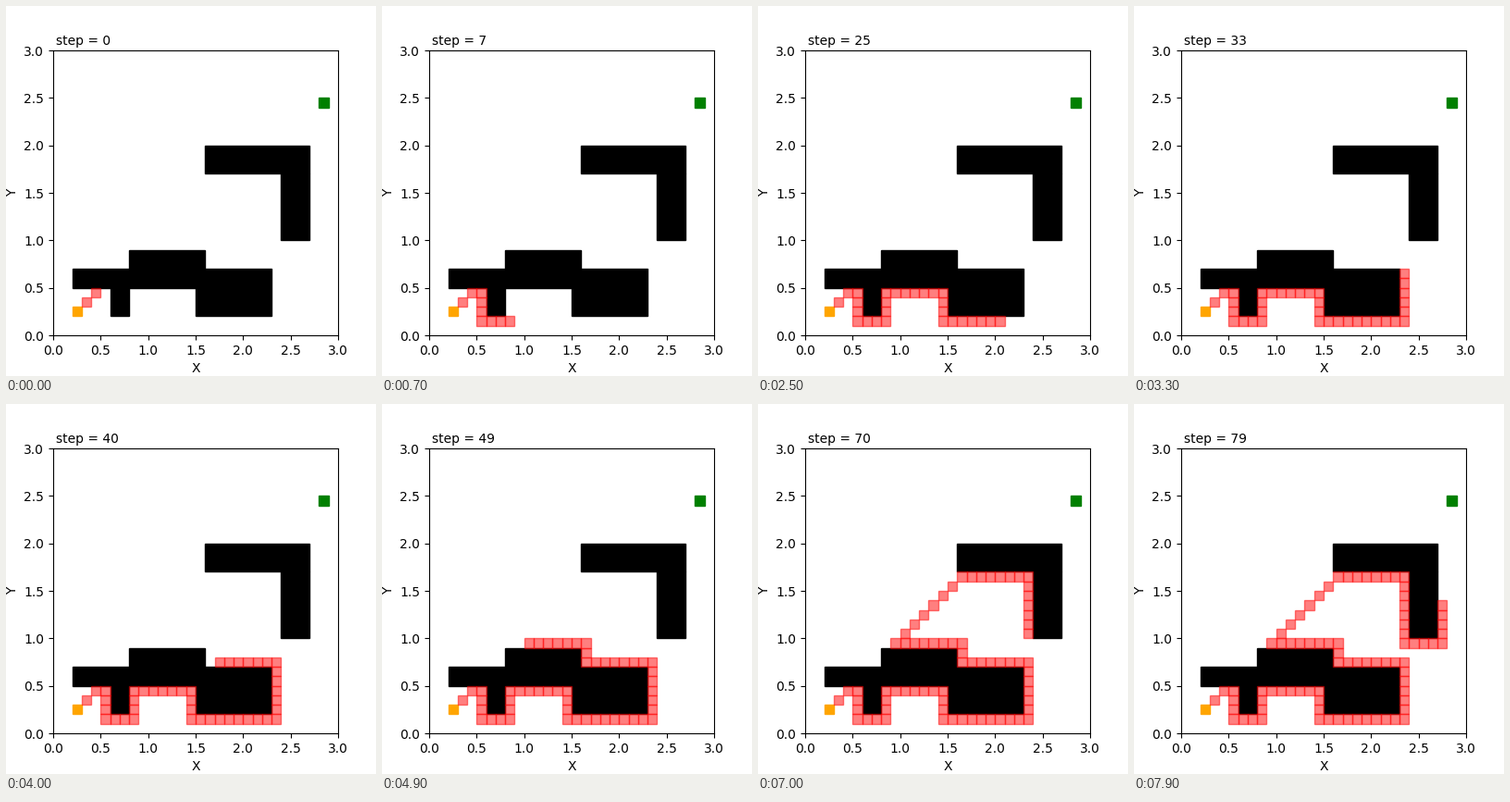
A matplotlib script for the animation above (8000 ms loop, 400x400 px).

```python
import matplotlib.pyplot as plt
from matplotlib.animation import FuncAnimation
from matplotlib.patches import Rectangle

CELL = 0.1
STEPS = 80
START, GOAL = (2, 2), (28, 24)

# left, bottom, right, top in grid cells
WALLS = [
    (2, 5, 8, 7), (6, 2, 8, 5), (8, 5, 16, 9), (15, 2, 23, 7),
    (16, 17, 27, 20), (24, 10, 27, 17),
]


def blocked(x, y):
    return any(l <= x < r and b <= y < t for l, b, r, t in WALLS)


def walk(count):
    """Go diagonally toward the goal; at a wall, keep it on the left
    until the diagonal is met again further on."""
    (x, y), hit = START, None
    dx, dy = 1, 0
    cells = []
    while len(cells) < count:
        on_line = x - START[0] == y - START[1]
        if on_line and (hit is None or x > hit):
            if blocked(x + 1, y + 1):
                hit, dx, dy = x, 1, 0
            else:
                hit = None
        if hit is None:
            x, y = x + 1, y + 1
        else:
            dx, dy = -dy, dx          # try left first, then turn right
            while blocked(x + dx, y + dy):
                dx, dy = dy, -dx
            x, y = x + dx, y + dy
        cells.append((x, y))
    return cells


fig, ax = plt.subplots(figsize=(4, 4), dpi=100)
ax.set_xlim(0, 3)
ax.set_ylim(0, 3)
ax.set_aspect("equal")
ax.set_xlabel("X")
ax.set_ylabel("Y")


def block(x, y, w=1, h=1, **style):
    return ax.add_patch(
        Rectangle((x * CELL, y * CELL), w * CELL, h * CELL, **style))


for l, b, r, t in WALLS:
    block(l, b, r - l, t - b, color="black")
block(*START, color="orange")
block(*GOAL, color="green")

trail = [block(x, y, color="red", alpha=0.5) for x, y in walk(STEPS + 1)]
label = ax.text(0.01, 1.02, "", transform=ax.transAxes)


def update(step):
    for k, cell in enumerate(trail):
        cell.set_visible(k < step + 2)
    label.set_text(f"step = {step}")
    return [*trail, label]


anim = FuncAnimation(fig, update, frames=STEPS, interval=100,
                     repeat=True, repeat_delay=0, blit=False)
plt.show()
```
